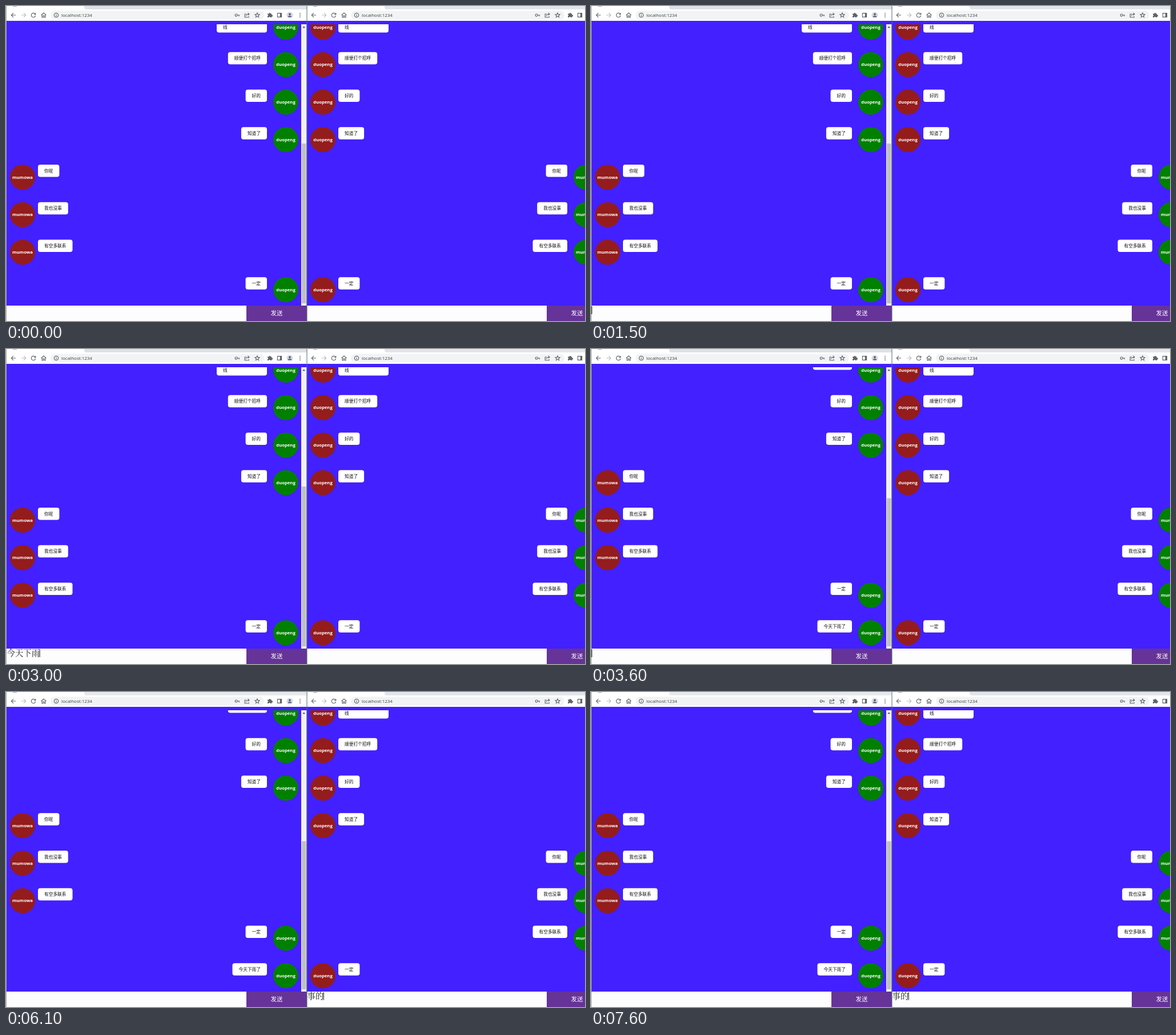
An HTML page with a canvas for the animation above (8 s loop, 1014 px wide and 552 px high).

```html
<!DOCTYPE html>
<html lang="zh-CN">
<head>
<meta charset="utf-8">
<title>Chat</title>
<style>
html, body { margin: 0; width: 100%; height: 100%; overflow: hidden; background: #fff; }
canvas { display: block; }
</style>
</head>
<body>
<canvas id="stage" width="1014" height="552"></canvas>
<script>
const ctx = document.getElementById('stage').getContext('2d');
const LOOP = 8000, PITCH = 65.75, PANE = 526;
const SANS = '"Noto Sans CJK SC", "Noto Sans CJK", sans-serif';
const LATIN = '"Open Sans", "Noto Sans", sans-serif';
const SERIF = '"Noto Serif CJK SC", "Noto Serif CJK", "Noto Sans CJK SC", serif';
const NAMES = { a: 'duopeng', b: 'mumowa' };
const SENT_AT = 3500, SWITCH_AT = 5000;

const messages = [
  ['a', '线'], ['a', '顺便打个招呼'], ['a', '好的'], ['a', '知道了'],
  ['b', '你呢'], ['b', '我也没事'], ['b', '有空多联系'],
  ['a', '一定'], ['a', '今天下雨了']
];

// [start, text, caret shown]
const leftInput = [
  [0, '', 0], [500, '', 1], [1000, '', 0], [1300, '', 1], [2000, '今天', 1],
  [3000, '今天下雨', 1], [3200, '今天下雨了', 1], [3500, '', 1],
  [4000, '', 0], [4500, '', 1], [5000, '', 0]
];
const rightInput = [
  [0, '', 0], [5500, '', 1], [6100, '事的', 1], [6400, '事的，', 1],
  [6700, '事的', 1], [6800, '事', 1], [6900, '', 1], [7600, '事的', 1]
];

function rect(x, y, w, h, color) {
  ctx.fillStyle = color;
  ctx.fillRect(x, y, w, h);
}

function round(x, y, w, h, r, color) {
  ctx.fillStyle = color;
  ctx.beginPath();
  ctx.roundRect(x, y, w, h, r);
  ctx.fill();
}

function disc(x, y, r, color) {
  ctx.fillStyle = color;
  ctx.beginPath();
  ctx.arc(x, y, r, 0, Math.PI * 2);
  ctx.fill();
}

function text(str, x, y, font, color, align = 'left') {
  ctx.font = font;
  ctx.fillStyle = color;
  ctx.textAlign = align;
  ctx.fillText(str, x, y);
}

function icon(x, y, path, color = '#5f6368', fill = false) {
  ctx.save();
  ctx.translate(x, y);
  ctx.lineWidth = 1.1;
  ctx.strokeStyle = ctx.fillStyle = color;
  const shape = new Path2D(path);
  if (fill) ctx.fill(shape);
  else ctx.stroke(shape);
  ctx.restore();
}

function star(x, y) {
  let path = '';
  for (let i = 0; i < 10; i++) {
    const r = i % 2 ? 1.9 : 4.3, a = i * Math.PI / 5;
    path += (i ? 'L' : 'M') + r * Math.sin(a) + ' ' + -r * Math.cos(a);
  }
  icon(x, y, path + 'Z');
}

function toolbar(strip) {
  rect(1, 0, PANE, 26, '#fff');
  ctx.fillStyle = strip;
  ctx.fill(new Path2D('M137 0H527V6H141Q137 6 137 2Z'));
  rect(12, 0, 7, 1, '#a4a7ab');
  round(78, 8.5, 374, 15, 7.5, '#f1f3f4');

  const arrow = 'M4 0H-3.6M0 -3.8L-3.8 0L0 3.8';
  icon(13, 16, arrow);
  ctx.save();
  ctx.translate(31, 16);
  ctx.scale(-1, 1);
  icon(0, 0, arrow, '#babcbe');
  ctx.restore();
  icon(48, 16, 'M3 -2.1A3.7 3.7 0 1 0 3.6 1M3.8 -4V-1H.8');
  icon(66, 16, 'M-4.3 0L0 -4L4.3 0M-3 -1V4H-1V1H1V4H3V-1');

  icon(88, 16, 'M3.7 0A3.7 3.7 0 1 1 -3.7 0A3.7 3.7 0 1 1 3.7 0M0 -.4V2.2M0 -2.2V-1.2');
  text('localhost:1234', 97, 19, '8px ' + LATIN, '#3c4043');

  icon(405, 16, 'M.2 0A2 2 0 1 1 -3.8 0A2 2 0 1 1 .2 0M0 0H4.2M3 0V2.2');
  icon(422, 16, 'M-1 -2H-3.8V3.8H3.2V2M-1.8 1.5Q-1.4 -1.7 3.6 -1.8M1.6 -4L4 -1.8L1.6 .4');
  star(440, 16.2);
  icon(462, 16, 'M-4 -2.6H-1.4A1.4 1.4 0 1 1 1.4 -2.6H3.2V-.4A1.4 1.4 0 1 1 3.2 2.2V4H.8A1.2 1.2 0 0 0 -1.6 4H-4V1.6A1.2 1.2 0 0 0 -4 -.8Z', '#5f6368', true);
  icon(479, 16, 'M-3.6 -3.4H3.6V3.4H-3.6Z');
  rect(479.8, 12.6, 2.8, 6.8, '#5f6368');
  disc(497, 16, 5.6, '#d5d9e4');
  disc(497, 14.4, 1.8, '#4d5670');
  icon(497, 16, 'M-3.3 3.2Q-3 .9 0 .9T3.3 3.2Z', '#4d5670', true);
  for (const dy of [-3.2, 0, 3.2]) disc(515, 16 + dy, .9, '#5f6368');
}

function message([who, body], row, me) {
  const mine = who === me;
  const y = 36.9 + row * PITCH;
  const width = body === '线' ? 88 : body.length * 7.7 + 22;
  const x = mine ? 457 - width : 56;
  round(x, y - 22, width, 21.5, 4, '#fff');
  // The wrapped bubble is taller; only its last line is in view.
  const shift = body === '线' ? 10.2 : 0;
  if (shift) round(x, y - 30, width, 39.6, 4, '#fff');
  text(body, x + 11, y - 8.4 + shift + (shift ? .8 : 0), '7.7px ' + SANS, '#111');
  const cx = mine ? 490 : 29;
  disc(cx, y, 22, mine ? '#008000' : '#941c1c');
  text(NAMES[who], cx, y + 2.7, 'bold 7.7px ' + LATIN, '#fff', 'center');
}

function scrollbar(top) {
  rect(517, 32, 9.5, 493, '#f1f1f1');
  icon(521.7, 37, 'M-2.4 1.2L0 -1.4L2.4 1.2Z', '#505050', true);
  rect(518, top, 7.5, 521 - top, '#c1c1c1');
}

function inputBar(steps, t) {
  const [, value, caret] = steps.findLast(s => s[0] <= t);
  rect(1, 525, 420, 27, '#fdfdfd');
  text(value, 1.5, 538.2, '14.4px ' + SERIF, '#222');
  if (caret) rect(1 + value.length * 14.4, 526, 1, 14, '#222');
  rect(421, 525, 106, 27, '#663399');
  text('发送', 474, 542.3, '10.5px ' + SANS, '#fff', 'center');
}

function pane(x, me, first, steps, t, strip) {
  ctx.save();
  ctx.translate(x, 0);
  toolbar(strip);
  rect(1, 26, PANE, 499, '#4320ff');
  ctx.save();
  ctx.beginPath();
  ctx.rect(1, 32, PANE, 493);
  ctx.clip();
  messages.slice(first, first + 8).forEach((m, row) => message(m, row, me));
  scrollbar(first ? 261.5 : 241);
  ctx.restore();
  inputBar(steps, t);
  ctx.restore();
}

function draw(t) {
  rect(0, 0, 1014, 552, '#fff');
  pane(0, 'a', t < SENT_AT ? 0 : 1, leftInput, t, t < SWITCH_AT ? '#dee1e6' : '#e7eaed');
  pane(PANE, 'b', 0, rightInput, t, '#e2e5e9');
  rect(0, 0, 1, 552, '#a9b0a6');
  rect(526.5, 0, 1, 552, '#53706c');
}

const start = performance.now();
function tick() {
  draw((performance.now() - start) % LOOP);
  requestAnimationFrame(tick);
}
tick();
</script>
</body>
</html>
```
